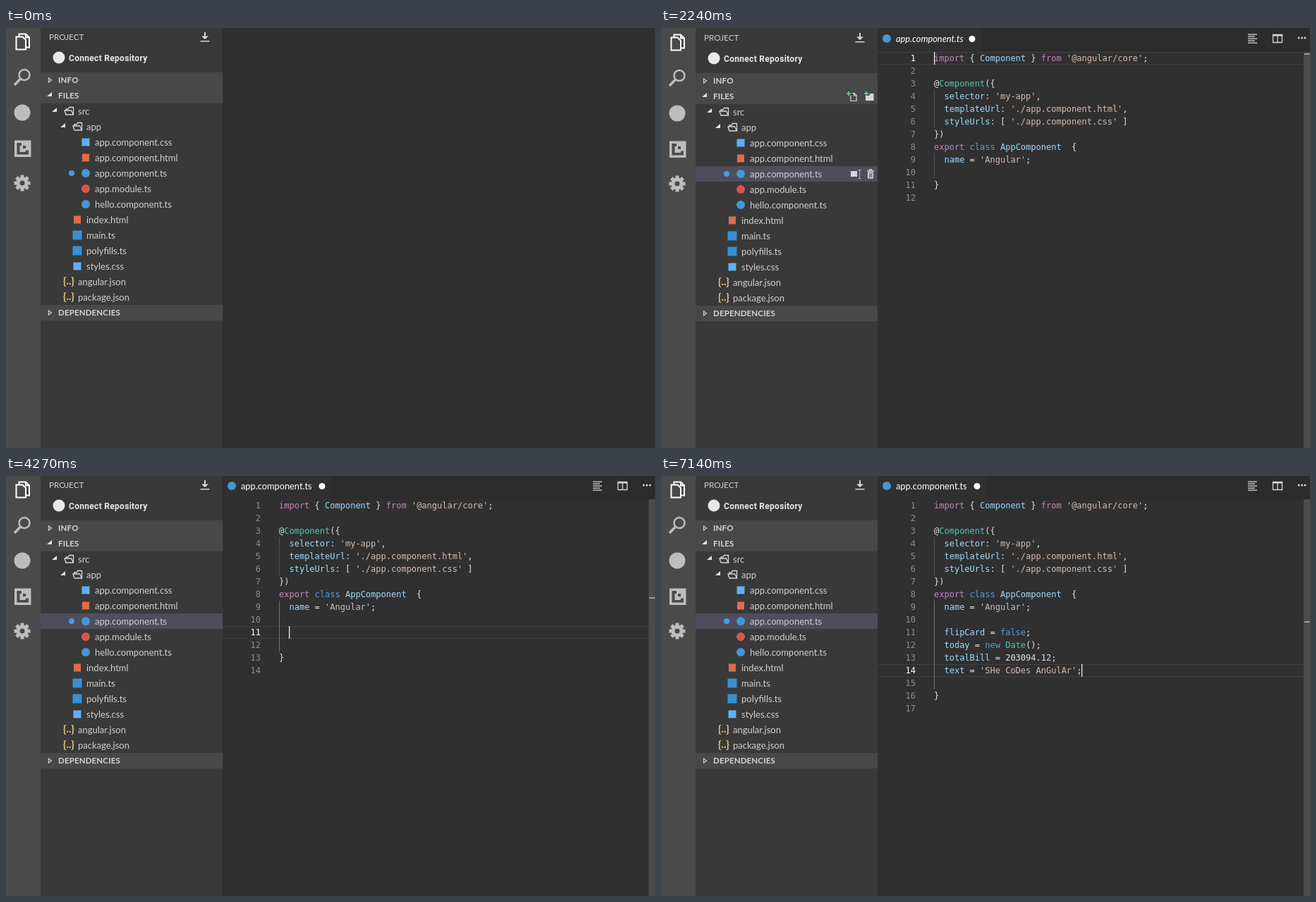
An HTML page that plays this animation: 920x596 px, repeating every 7210 ms.

```html
<!DOCTYPE html>
<html lang="en">
<head>
<meta charset="utf-8">
<title>Code editor</title>
<style>
html, body { margin: 0; width: 100%; height: 100%; overflow: hidden; background: #303030; }
svg { display: block; }
text { font: 13px Lato, sans-serif; fill: #cfcfcf; white-space: pre; }
.top { font-size: 11.7px; }
.head { font-weight: 700; font-size: 11.5px; letter-spacing: .15px; fill: #d4d4d4; }
.repo { font: 700 12px Roboto, sans-serif; letter-spacing: .3px; fill: #e8e8e8; }
.json { font-size: 14.5px; font-weight: 700; fill: #eac983; }
.tab { font-size: 12.8px; fill: #fff; }
.code { font: 12px "DejaVu Sans Mono", monospace; fill: #e2e2e2; }
.num { fill: #8c8c8c; text-anchor: end; }
.now { fill: #fff; }
.k { fill: #c586c0; } .v { fill: #9cdcfe; } .s { fill: #d6bcae; }
.t { fill: #4ec9b0; } .b { fill: #569cd6; }
</style>
</head>
<body>
<svg id="stage" width="920" height="596" viewBox="0 0 920 596"></svg>
<script>
const LOOP = 7210, ROW = 18, CHAR = 7.224, LEFT = 387, TOP = 33;
const stage = document.getElementById('stage');

const rect = (x, y, w, h, fill, more = '') =>
  `<rect x="${x}" y="${y}" width="${w}" height="${h}" fill="${fill}" ${more}/>`;
const disc = (x, y, r, fill) => `<circle cx="${x}" cy="${y}" r="${r}" fill="${fill}"/>`;
const label = (x, y, s, cls = '') => `<text x="${x}" y="${y}" class="${cls}">${s}</text>`;
const fill = (d, c) => `<path d="${d}" fill="${c}" fill-rule="evenodd"/>`;
const line = (d, c, w = 1) => `<path d="${d}" fill="none" stroke="${c}" stroke-width="${w}"/>`;
const group = (id, body) => `<g id="${id}">${body}</g>`;

// Twisties
const closed = (x, y) => line(`M${x - 1.5} ${y - 3}l4 3l-4 3z`, '#d0d0d0', 1.2);
const opened = (x, y) => fill(`M${x + 3} ${y - 4}v6h-7z`, '#e4e4e4');

const folder = (x, y) =>
  line(`M${x - 4} ${y - 1.5}v-1.5h3l1.500-2.500h6v10.500M${x - 6} ${y - 1}h9.500l3 6h-10.500z`, '#d8d8d8', 1.3);

const badge = {
  css: (x, y) => rect(x - 5.5, y - 5.5, 11, 11, '#62aef0'),
  html: (x, y) => rect(x - 5, y - 5.5, 10, 11, '#dc6e4c'),
  ng: (x, y) => disc(x, y, 6, '#4398d4'),
  mod: (x, y) => disc(x, y, 6, '#d4564e'),
  ts: (x, y) => rect(x - 6.5, y - 6.5, 13, 13, '#398fd2'),
  json: (x, y) => label(x - 8, y + 3.5, '{..}', 'json'),
  dir: folder
};

const tree = [
  [0, 'dir', 'src'], [1, 'dir', 'app'], [2, 'css', 'app.component.css'],
  [2, 'html', 'app.component.html'], [2, 'ng', 'app.component.ts'],
  [2, 'mod', 'app.module.ts'], [2, 'ng', 'hello.component.ts'],
  [1, 'html', 'index.html'], [1, 'ts', 'main.ts'], [1, 'ts', 'polyfills.ts'],
  [1, 'css', 'styles.css'], [0, 'json', 'angular.json'], [0, 'json', 'package.json']
];

function gear(x, y) {
  let teeth = '';
  for (let a = 0; a < 360; a += 45)
    teeth += rect(x - 2.5, y - 11.5, 5, 6, '#bdbdbd', `transform="rotate(${a} ${x} ${y})"`);
  return teeth + `<circle cx="${x}" cy="${y}" r="6" fill="none" stroke="#bdbdbd" stroke-width="5"/>`;
}

function activityBar() {
  return rect(0, -2, 49, 600, '#4a4a4a') +
    line('M18.5 12V8.5h9.5l5 5v14h-4M28 8.5v5h5', '#fff', 2) +
    line('M14.5 12.5h9l4.5 4.5v13.5h-13.5z', '#fff', 2) +
    `<circle cx="26" cy="66.5" r="7.5" fill="none" stroke="#bdbdbd" stroke-width="2.5"/>` +
    line('M20.5 72l-8.5 9', '#bdbdbd', 3.5) +
    disc(23, 120, 11.5, '#bdbdbd') +
    fill('M12 159.500h23.500v23.500h-23.500zM15.500 163v16.500h16.500v-6h-4v2.500h-8.500v-9h2.500v-4z', '#bdbdbd') +
    rect(24, 167, 4, 4, '#4a4a4a') +
    gear(23, 220);
}

function sidebar() {
  let out = rect(49, -2, 258, 600, '#393939') +
    label(61, 17, 'PROJECT', 'top') +
    fill('M281 6h2v5.500h4l-5 4.500l-5-4.500h4zM275.500 18h13v1.500h-13z', '#d8d8d8') +
    disc(75, 42, 8.5, '#e8e8e8') + label(89, 47, 'Connect Repository', 'repo') +
    rect(49, 63, 258, 44, '#484848') + rect(49, 393, 258, 22, '#484848') +
    closed(62, 74) + label(74, 78, 'INFO', 'head') +
    opened(62, 95) + label(74, 100, 'FILES', 'head') +
    closed(62, 404) + label(74, 408, 'DEPENDENCIES', 'head') +
    group('picked', rect(49, 195, 258, 22, '#4f4d5a'));
  tree.forEach(([depth, kind, name], i) => {
    const x = 89 + depth * 12, y = 118 + i * 22;
    out += badge[kind](x, y) + label(x + 13, y + 4.5, name);
    if (kind === 'dir') out += opened(x - 20, y - 1);
  });
  return out + disc(93, 206, 4, '#3f9df0');
}

function hoverIcons() {
  const plus = (x, y) => line(`M${x - 3} ${y}h6M${x} ${y - 3}v6`, '#7fca84', 1.6);
  return group('hover',
    line('M269 94.5v8h8v-8l-3-3h-3M273.5 91.5v3.5h3.5', '#d8d8d8', 1.2) + plus(266, 92) +
    fill('M290 102v-7h5l1.5-3h5v10z', '#d8d8d8') + plus(291, 92) +
    rect(269, 202, 9, 8, '#d8d8d8') +
    line('M279 200.5h5M281.5 200.5v12M279 212.5h5', '#8fa9c4', 1.2) +
    line('M292 202h10M295.5 202v-2h3v2', '#d8d8d8', 1.5) +
    fill('M293 203.5h8v9h-8zM294.8 205v6h1v-6zM296.6 205v6h1v-6zM298.4 205v6h1v-6z', '#d8d8d8'));
}

function toolbar() {
  let out = '';
  [8, 11, 14, 17, 20].forEach((y, i) => out += rect(832, y - .5, i % 2 ? 10 : 13, 1.3, '#d4d4d4'));
  out += line('M867.5 8.5h13v11h-13zM874 8.5v11', '#d4d4d4', 1.3) + rect(867, 8, 14, 2.5, '#d4d4d4');
  [904, 908.5, 913].forEach(x => out += disc(x, 13, 1.5, '#d4d4d4'));
  return out;
}

const span = (c, s) => `<tspan class="${c}">${s}</tspan>`;
const head = [
  `${span('k', 'import')} { ${span('v', 'Component')} } ${span('k', 'from')} ${span('s', "'@angular/core'")};`,
  '',
  `@${span('t', 'Component')}({`,
  `  ${span('v', 'selector:')} ${span('s', "'my-app'")},`,
  `  ${span('v', 'templateUrl:')} ${span('s', "'./app.component.html'")},`,
  `  ${span('v', 'styleUrls:')} [ ${span('s', "'./app.component.css'")} ]`,
  '})',
  `${span('k', 'export')} ${span('b', 'class')} ${span('v', 'AppComponent')}  {`,
  `  ${span('v', 'name')} = ${span('s', "'Angular'")};`
];
const added = [
  '',
  `  ${span('v', 'flipCard')} = ${span('b', 'false')};`,
  `  ${span('v', 'today')} = ${span('b', 'new')} ${span('t', 'Date')}();`,
  `  ${span('v', 'totalBill')} = 203094.12;`,
  `  ${span('v', 'text')} = ${span('s', "'SHe CoDes AnGulAr'")};`
];
const foot = ['', '}', ''];

// Each step: start, inserted lines, caret line, caret column, ruler mark
const steps = [
  [2170, [], 1, 0, 35],
  [3010, [], 9, 19, 149],
  [3780, [''], 10, 2, 160],
  [4200, ['', ''], 11, 2, 172],
  [4890, added, 14, 29, 206]
];

function editor([start, extra, row, col, mark]) {
  const rows = [...head, ...extra, ...foot];
  const edited = extra.length > 0, tabEnd = edited ? 461 : 455;
  const y = TOP + (row - 1) * ROW;
  let out = rect(307, -2, 613, 600, '#303030') +
    rect(tabEnd, -2, 920 - tabEnd, TOP + 2, '#2c2c2c') +
    disc(320, 14, 6, '#4398d4') +
    `<text class="tab" x="333" y="18.5" font-style="italic" style="font-style:${edited ? 'normal' : 'italic'}">app.component.ts</text>` +
    disc(edited ? 448 : 441, 14.5, 4.5, '#fff') + toolbar() +
    line(`M307 ${y + .5}H912M307 ${y + ROW - .5}H912`, '#414141') +
    rect(911, TOP, 9, 565, '#4c4c4c') + rect(912, mark, 8, 2, '#9a9a9a') +
    rect(LEFT, TOP + 3 * ROW, 1, 3 * ROW, '#505050') +
    rect(LEFT, TOP + 8 * ROW, 1, (extra.length + 2) * ROW, row > 1 ? '#707070' : '#505050');
  rows.forEach((s, i) => {
    const base = TOP + i * ROW + 13;
    out += label(361, base, i + 1, 'code num' + (i + 1 === row ? ' now' : '')) + label(LEFT, base, s, 'code');
  });
  return out + rect(LEFT + Math.round(col * CHAR), y, 1.3, ROW, '#f0f0f0', 'class="caret"');
}

stage.innerHTML = group('app', activityBar() + sidebar() + hoverIcons() +
  steps.map((s, i) => group('view' + i, editor(s))).join(''));

const el = id => document.getElementById(id);
const show = (node, on) => node.style.display = on ? '' : 'none';
const within = (t, a, b) => t >= a && t < b;
const views = steps.map((s, i) => el('view' + i));
const carets = views.map(v => v.querySelector('.caret'));

function draw(t) {
  show(el('hover'), within(t, 1820, 2590));
  show(el('picked'), t >= 2170);
  el('app').setAttribute('transform', `translate(0 ${within(t, 2170, 2450) ? 1 : 0})`);
  steps.forEach(([start], i) => {
    const end = i + 1 < steps.length ? steps[i + 1][0] : LOOP;
    show(views[i], within(t, start, end));
    show(carets[i], Math.floor((t - start) / 500) % 2 === 0);
  });
}

const origin = performance.now();
function tick() {
  draw((performance.now() - origin) % LOOP);
  requestAnimationFrame(tick);
}
draw(0);
requestAnimationFrame(tick);
</script>
</body>
</html>
```
